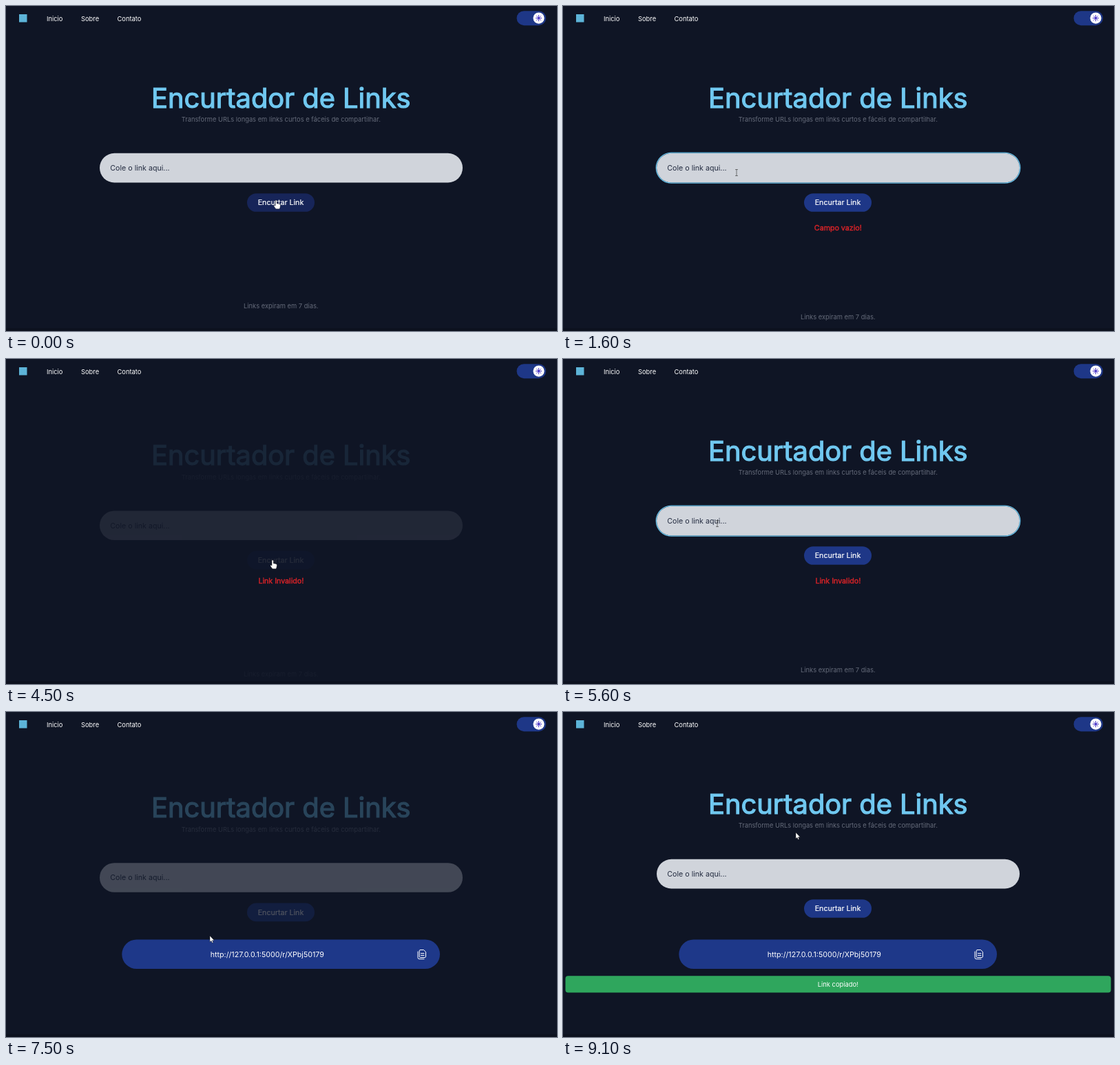
An HTML page that plays this animation: 800x472 px, repeating every 9200 ms.

```html
<!DOCTYPE html>
<html lang="pt">
<head>
<meta charset="utf-8">
<title>Encurtador de Links</title>
<style>
html, body { margin: 0; width: 100%; height: 100%; overflow: hidden; background: #0f1525; }
svg { display: block; width: 100vw; height: 100vh; }
text { font-family: Inter, sans-serif; font-size: 9.33px; font-optical-sizing: none; fill: #fff; white-space: pre; }
.mid { text-anchor: middle; }
.body { font-size: 10.67px; }
.muted { fill: #656b7a; }
.title { font-size: 39.8px; fill: #70c8f0; stroke: #70c8f0; stroke-width: 1.2px; }
.error { font-size: 10.67px; fill: #d62328; stroke: #d62328; stroke-width: .42px; }
.pop text { font-family: "Open Sans", sans-serif; font-size: 8.8px; }
.line { fill: none; stroke-linecap: round; stroke-linejoin: round; }
</style>
</head>
<body>
<svg viewBox="0 0 800 472">
  <defs>
    <filter id="shade" x="-20%" y="-50%" width="140%" height="250%">
      <feDropShadow dx="0" dy="4" stdDeviation="4" flood-opacity=".3"/>
    </filter>
  </defs>
  <rect width="800" height="472" fill="#0f1525"/>
  <rect y="468" width="800" height="4" fill="#0c111e"/>

  <rect x="19" y="12" width="11.5" height="11.5" fill="#5db4d8"/>
  <text x="59" y="21.5">Inicio</text>
  <text x="109" y="21.5">Sobre</text>
  <text x="161.5" y="21.5">Contato</text>
  <rect x="741.5" y="7.2" width="42.5" height="21" rx="10.5" fill="#1e3787"/>
  <circle cx="773.5" cy="17.6" r="8.1" fill="#fff"/>
  <path class="line" stroke="#4a36c8" stroke-width="1" d="M773.5 13.4v8.4M769.3 17.6h8.4M770.5 14.6l6 6M776.5 14.6l-6 6"/>

  <g id="page">
    <text class="title mid" x="399.3" y="147.5">Encurtador de Links</text>
    <text class="muted mid" x="399.3" y="168.4">Transforme URLs longas em links curtos e fáceis de compartilhar.</text>
    <rect x="136" y="213.8" width="527" height="42.6" rx="21.3" fill="#d0d4db"/>
    <rect id="ring" class="line" x="135.3" y="213.1" width="528.4" height="44" rx="22" stroke="#69c2ea" stroke-width="1.35"/>
    <text id="field" class="body" x="151.3" y="239"></text>
    <path id="caret" class="line" stroke="#111" stroke-width=".8" d="M0 229v12.5"/>
    <rect id="button" x="350" y="272.2" width="98" height="26.6" rx="13.3"/>
    <text class="body mid" x="399" y="289.3" stroke="#fff" stroke-width=".2">Encurtar Link</text>
    <text id="footer" class="muted mid" x="399.3">Links expiram em 7 dias.</text>
  </g>

  <text id="error" class="error mid" x="399.3" y="326.3"></text>

  <g id="result">
    <rect x="168.3" y="330.5" width="461.7" height="42.6" rx="21.3" fill="#1e3889"/>
    <text class="body mid" x="379.3" y="355.6">http://127.0.0.1:5000/r/XPbj50179</text>
    <path class="line" stroke="#fff" stroke-width="1" d="M601.5 345.5h5l3 3v6.7q0 1.3-1.3 1.3h-6.7q-1.3 0-1.3-1.3v-8.4q0-1.3 1.3-1.3M598 348v8.7q0 2 2 2h7M602.5 350.6h4.5M602.5 353.4h4.5"/>
  </g>

  <g id="toast">
    <rect x="3.5" y="383.2" width="792" height="24.3" rx="4" fill="#2fa65d"/>
    <text class="mid" x="399.3" y="398.9">Link copiado!</text>
  </g>

  <g id="pop" class="pop">
    <rect id="popBox" y="204.5" height="23.3" rx="4.5" fill="#2b2b2e" filter="url(#shade)"/>
    <text y="220.4" x="14"></text><text y="220.4" x="50"></text><text y="220.4"></text>
  </g>

  <g id="cursor">
    <path id="arrow" d="M0 0V9L2 7.2 3.4 10.3 4.8 9.7 3.5 6.7H6.3Z" fill="#fff" stroke="#111" stroke-width=".4"/>
    <path id="hand" d="M0 1a1.1 1.1 0 0 1 2.2 0V4.8l3.7.8q1.6.4 1.5 2l-.5 3.2q-.3 1.6-1.2 2H1.6Q.4 12.4-.5 11L-2.1 8.5q-.2-1.4.9-1.3L0 8.2Z" fill="#fff" stroke="#111" stroke-width=".4"/>
    <path id="beam" class="line" stroke="#444" stroke-width=".7" d="M-1.5-4.5h3M0-4.5v9M-1.5 4.5h3"/>
  </g>
</svg>
<script>
const LOOP = 9200, STEP = 100, RISE = 7.3;
const $ = id => document.getElementById(id);
const show = (id, on) => $(id).setAttribute('visibility', on ? 'visible' : 'hidden');
const within = (t, a, b) => t >= a && t < b;

// page reloads: moment of reload, start of the one-second fade
const reloads = [[400, 490], [4400, 4400], [7200, 7315]];
const path = [
  [0, 391, 282], [400, 391, 282], [800, 298, 290], [1400, 252, 242],
  [3600, 252, 242], [4200, 386, 292], [4700, 386, 292], [5400, 224, 239],
  [6300, 224, 239], [6900, 390, 288], [7200, 390, 288], [7500, 296, 325],
  [7700, 296, 325], [8400, 602, 350], [8600, 602, 350], [9100, 338, 175]
];
const typing = [[2400, 'l'], [2600, 'li'], [2700, 'lin'], [2900, 'link'], [4400, ''],
  [6300, 'https://example.com/artigos/guia-completo'], [7200, '']];

// the CSS "ease" curve
function ease(x) {
  if (x <= 0) return 0;
  if (x >= 1) return 1;
  const bez = (u, a, b) => 3 * a * u * (1 - u) ** 2 + 3 * b * u * u * (1 - u) + u ** 3;
  let lo = 0, hi = 1;
  for (let i = 0; i < 24; i++) {
    const m = (lo + hi) / 2;
    if (bez(m, .25, .25) < x) lo = m; else hi = m;
  }
  return bez(lo, .1, 1);
}

function pointer(t) {
  const i = path.findIndex(p => p[0] > t);
  if (i < 0) return path[path.length - 1].slice(1);
  const [t0, x0, y0] = path[i - 1], [t1, x1, y1] = path[i];
  let k = (t - t0) / (t1 - t0);
  k = k * k * (3 - 2 * k);
  return [x0 + (x1 - x0) * k, y0 + (y1 - y0) * k];
}

function popup(t, caretX) {
  const on = within(t, 2400, 3500);
  show('pop', on);
  if (!on) return;
  const full = t >= 2900;
  const words = full ? ['links', 'linkagem-catalogo', 'linka'] : ['links', 'linha', 'linka'];
  const labels = $('pop').querySelectorAll('text');
  words.forEach((w, i) => labels[i].textContent = w);
  labels[2].setAttribute('x', full ? 141 : 86);
  $('popBox').setAttribute('width', full ? 168.5 : 140);
  $('pop').setAttribute('transform', `translate(${caretX - 1.7} 0)`);
}

function draw(t) {
  const last = reloads.filter(r => t >= r[0]).pop();
  const alpha = last ? ease((t - last[1]) / 1000) : 1;
  const dy = RISE * (1 - alpha);
  $('page').setAttribute('opacity', alpha);
  $('page').setAttribute('transform', `translate(0 ${dy})`);

  const focus = within(t, 1600, 4400) || within(t, 5500, 7200);
  show('ring', focus);

  const typed = (typing.filter(s => t >= s[0]).pop() || [0, ''])[1];
  const field = $('field');
  field.textContent = typed || 'Cole o link aqui...';
  field.style.fill = typed ? '#0c0f18' : '#242c40';
  const caretX = 151.8 + (typed ? field.getComputedTextLength() : 0);
  $('caret').setAttribute('transform', `translate(${caretX} 0)`);
  show('caret', focus && typed);
  popup(t, caretX);

  $('footer').setAttribute('y', t < 400 ? 438.6 : 454.6);
  show('footer', t < 7200);
  $('error').textContent = within(t, 400, 4400) ? 'Campo vazio!' : within(t, 4400, 7200) ? 'Link Invalido!' : '';
  show('result', t >= 7200);

  const pop = ease((t - 8600) / 300);
  $('toast').setAttribute('opacity', pop);
  $('toast').setAttribute('transform', `translate(0 ${3 * (1 - pop)})`);

  const [x, y] = pointer(t);
  const over = (l, top, r, b) => within(x, l, r) && within(y, top, b);
  const onButton = over(350, 272 + dy, 448, 298.6 + dy);
  const onField = over(136, 213.6 + dy, 663, 256.2 + dy);
  const onCopy = t >= 7200 && over(595, 343, 612, 361);
  $('button').setAttribute('fill', onButton ? '#172559' : '#1e3787');
  show('hand', onButton || onCopy);
  show('beam', onField);
  show('arrow', !onButton && !onCopy && !onField);
  $('cursor').setAttribute('transform', `translate(${x} ${y})`);
}

const start = performance.now();
function tick() {
  const t = (performance.now() - start) % LOOP;
  draw(Math.floor(t / STEP) * STEP);
  requestAnimationFrame(tick);
}
tick();
</script>
</body>
</html>
```
